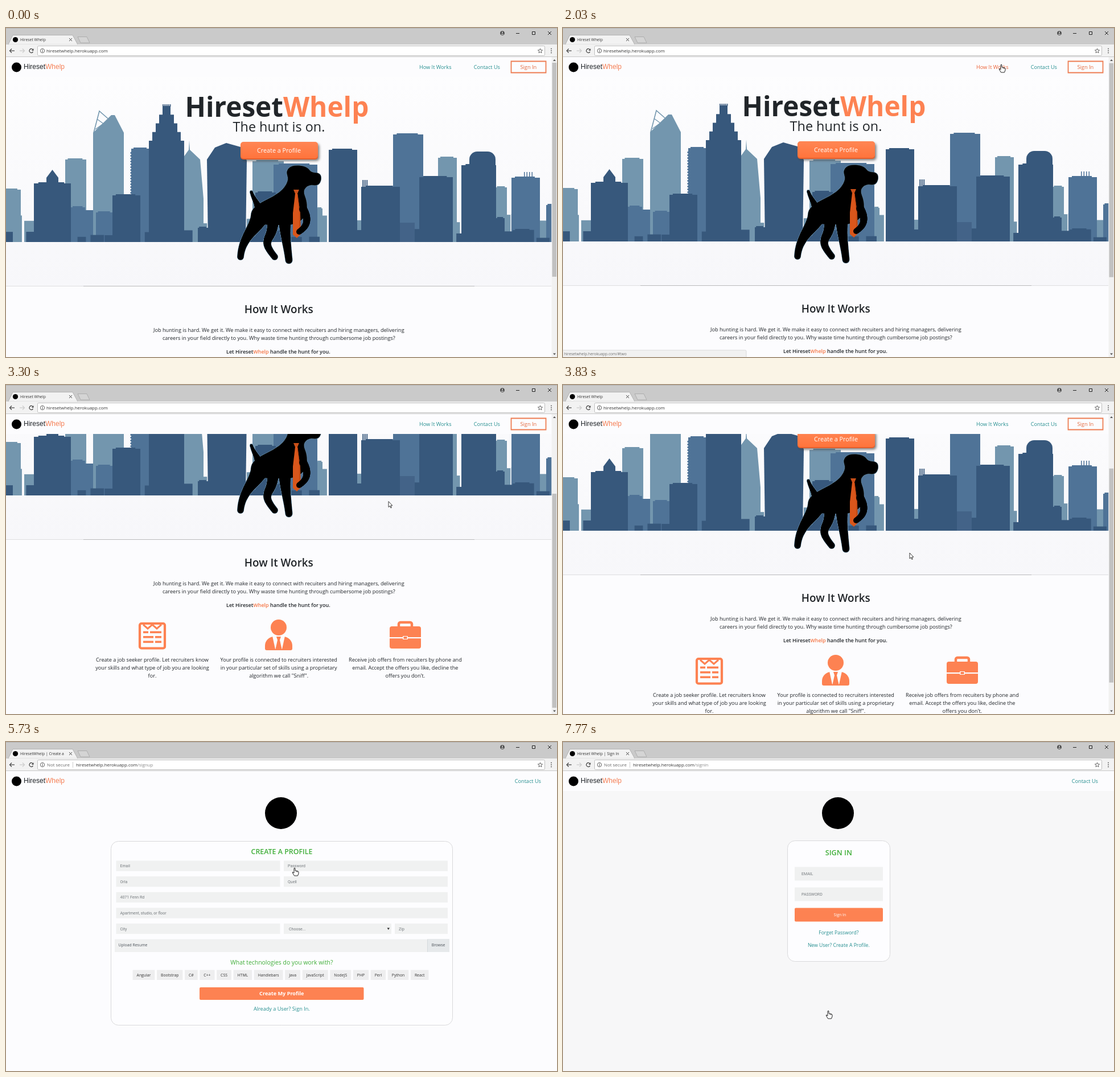
Animation, 968 px wide and 578 px high, one loop 8000 ms. Source, as an HTML page with a canvas:

```html
<!DOCTYPE html>
<html lang="en">
<head>
<meta charset="utf-8">
<title>Hireset Whelp</title>
<style>
html, body { margin: 0; width: 100%; height: 100%; overflow: hidden; background: #fcfcfe; }
canvas { display: block; width: 968px; height: 578px; }
</style>
</head>
<body>
<canvas id="stage" width="968" height="578"></canvas>
<script>
const ctx = document.getElementById('stage').getContext('2d');
const LOOP = 8000, MAX_SCROLL = 182;
const SIGNUP_AT = 5330, SIGNIN_AT = 7300;
const ORANGE = '#fd8252', TEAL = '#268f90', INK = '#212529', GREEN = '#3fae38', HOVER = '#ec6236';
const PAGE = '#fcfcfe', LIGHT = '#7396ae', MID = '#4f7397', DARK = '#37587c';
const HOST = 'hiresetwhelp.herokuapp.com';

const clamp = v => Math.min(1, Math.max(0, v));
const ramp = (t, a, b) => clamp((t - a) / (b - a));
const ease = p => p * p * (3 - 2 * p);
const mix = (a, b, p) => a + (b - a) * p;
const between = (t, a, b) => t >= a && t < b;

function randomizer(seed) {
  return () => {
    seed = (seed * 16807) % 2147483647;
    return seed / 2147483647;
  };
}

// ---------- drawing helpers ----------
function text(str, x, y, size, color = INK, { weight = 400, align = 'left', font = 'Open Sans' } = {}) {
  ctx.font = `${weight} ${size}px "${font}", sans-serif`;
  ctx.textAlign = align;
  ctx.fillStyle = color;
  ctx.fillText(str, x, y);
  return ctx.measureText(str).width;
}
const centered = (str, x, y, size, color, weight = 400) =>
  text(str, x, y, size, color, { weight, align: 'center' });

function paint(fill, stroke, line = 1) {
  if (fill) { ctx.fillStyle = fill; ctx.fill(); }
  if (stroke) { ctx.strokeStyle = stroke; ctx.lineWidth = line; ctx.stroke(); }
}
function rect(x, y, w, h, color) {
  ctx.fillStyle = color;
  ctx.fillRect(x, y, w, h);
}
function round(x, y, w, h, r, fill, stroke, line) {
  ctx.beginPath();
  ctx.roundRect(x, y, w, h, r);
  paint(fill, stroke, line);
}
function disc(x, y, r, fill, stroke, line) {
  ctx.beginPath();
  ctx.arc(x, y, r, 0, Math.PI * 2);
  paint(fill, stroke, line);
}
function trace(p, close) {
  ctx.beginPath();
  for (let i = 0; i < p.length; i += 2) ctx.lineTo(p[i], p[i + 1]);
  if (close) ctx.closePath();
}
const poly = (p, fill, stroke, line) => { trace(p, true); paint(fill, stroke, line); };
const lines = (p, stroke, line) => { trace(p, false); paint(null, stroke, line); };

// Closed curve through the midpoints of a polygon
function blob(p, fill, stroke, line) {
  const n = p.length;
  const mid = i => [(p[i % n] + p[(i + 2) % n]) / 2, (p[(i + 1) % n] + p[(i + 3) % n]) / 2];
  ctx.beginPath();
  ctx.moveTo(...mid(n - 2));
  for (let i = 0; i < n; i += 2) ctx.quadraticCurveTo(p[i], p[i + 1], ...mid(i));
  paint(fill, stroke, line);
}

// Tapered cubic curve
function limb([x0, y0, x1, y1, x2, y2, x3, y3], r0, r1, color) {
  const cubic = (a, b, c, d, p, q) => a * q ** 3 + 3 * b * p * q * q + 3 * c * p * p * q + d * p ** 3;
  for (let i = 0; i <= 48; i++) {
    const p = i / 48, q = 1 - p;
    disc(cubic(x0, x1, x2, x3, p, q), cubic(y0, y1, y2, y3, p, q), r1 + (r0 - r1) * q ** 1.5, color);
  }
}

// ---------- browser window ----------
function chrome(title, path, secureLabel) {
  rect(0, 0, 968, 29.5, '#cacaca');
  rect(0, 0, 968, 1, '#b4b4b4');
  rect(0, 29, 968, 22, '#f2f2f2');
  poly([4, 29, 12, 12.5, 117, 12.5, 126, 29], '#f2f2f2', '#a9a9a9', .8);
  rect(4.5, 28.5, 121, 2, '#f2f2f2');
  poly([126, 15.5, 142, 15.5, 147, 26, 131, 26], '#d4d4d4', '#a5a5a5', .8);
  disc(16.5, 20.5, 4.6, '#000');
  ctx.save();
  ctx.beginPath();
  ctx.rect(24, 12, 80, 16);
  ctx.clip();
  text(title, 25, 23, 6.85, '#333');
  ctx.restore();
  const cross = (x, y, r, color) => {
    lines([x - r, y - r, x + r, y + r], color);
    lines([x + r, y - r, x - r, y + r], color);
  };
  cross(113.5, 20.5, 2.5, '#444');

  disc(872, 9, 3.8, '#444');
  disc(872, 7.8, 1.3, '#ccc');
  rect(870, 10, 4, 1.5, '#ccc');
  lines([896, 9.5, 902, 9.5], '#222');
  round(924.5, 6.5, 5, 5, 0, null, '#222');
  cross(955, 9, 3, '#222');

  const arrow = (x, dir, color) => {
    lines([x - 4, 40, x + 4, 40], color, 1.2);
    lines([x + dir, 36.5, x + dir * 4.5, 40, x + dir, 43.5], color, 1.2);
  };
  arrow(11, -1, '#444');
  arrow(28, 1, '#ccc');
  ctx.beginPath();
  ctx.arc(44.5, 40, 3.4, .5, 5.5);
  paint(null, '#444', 1.2);
  poly([48.5, 36, 48.5, 39.8, 44.8, 39.8], '#444');

  round(55.5, 31.5, 891, 17, 2, '#fff', '#bebebe');
  disc(64, 40, 3.7, null, '#555', .9);
  rect(63.5, 39.3, 1.1, 3, '#555');
  rect(63.5, 37.5, 1.1, 1.1, '#555');
  let x = 71;
  if (secureLabel) {
    text('Not secure', 72, 43, 7.9, '#666');
    rect(117, 35, 1, 10, '#ccc');
    x = 123;
  }
  x += text(HOST, x, 43, 7.9, '#333');
  text(path, x, 43, 7.9, '#888');
  const star = [];
  for (let i = 0; i < 10; i++) {
    const a = i * Math.PI / 5 - Math.PI / 2, r = i % 2 ? 1.9 : 4.3;
    star.push(938.5 + r * Math.cos(a), 40.3 + r * Math.sin(a));
  }
  poly(star, null, '#555', .9);
  for (let y = 36.5; y < 44; y += 3.5) disc(958, y, .9, '#555');
  rect(0, 50, 968, 1, '#c8c8c8');
}

function brand() {
  disc(18.5, 69, 8.5, '#000');
  const w = text('Hireset', 31, 72.3, 12, INK, { font: 'Liberation Sans' });
  text('Whelp', 31 + w, 72.3, 12, '#f57f55', { font: 'Liberation Sans' });
}

function status(path, alpha) {
  if (alpha <= 0) return;
  ctx.globalAlpha = alpha;
  round(-2, 566, 324, 14, 2, '#f1f1f1', '#d2d2d2', .8);
  text(HOST + path, 2, 575, 6.7, '#707070');
  ctx.globalAlpha = 1;
}

function scrollbar(scroll) {
  rect(958.5, 51, 9.5, 527, '#f1f1f1');
  rect(959.5, 61 + scroll * 130 / MAX_SCROLL, 7.5, 376, '#c1c1c1');
  poly([961, 58, 966, 58, 963.5, 55], '#555');
  poly([961, 571.5, 966, 571.5, 963.5, 574.5], '#555');
}

// ---------- landing page ----------
const GROUND = 376;

// A block with a slightly raised roof ledge
function tower(x, w, top, color) {
  rect(x, top, w, GROUND - top, color);
  rect(x + w * .12, top - 2, w * .7, 2, color);
}

function spikes(x, count, gap, top, h, color) {
  for (let i = 0; i < count; i++) rect(x + i * gap, top, 1.5, h, color);
}

function lowRow(seed, color, minH, spread, gap) {
  const random = randomizer(seed);
  for (let x = 0; x < 958;) {
    const w = 12 + 18 * random(), h = minH + spread * random();
    rect(x, GROUND - h, w, h, color);
    x += w + gap * random();
  }
}

function skyline() {
  lowRow(11, LIGHT, 26, 24, 10);
  tower(-8, 34, 284, LIGHT);
  tower(104, 37, 231, LIGHT);
  tower(433, 55, 234, LIGHT);
  tower(759, 33, 228, LIGHT);
  tower(860, 20, 280, LIGHT);
  tower(546, 10, 317, LIGHT);
  poly([153, GROUND, 153, 184, 185, 153, 191, 153, 207, 184, 207, GROUND], LIGHT);
  lines([154, 184, 164, 146, 179, 159], LIGHT, 1.6);
  lines([160, 160, 171, 168, 157, 178], LIGHT, 1.3);
  poly([311, GROUND, 311, 228, 321, 214, 322, 197, 323, 214, 341, 231, 347, 300, 347, GROUND], LIGHT);

  tower(114, 25, 315, MID);
  rect(139, 320, 14, GROUND - 320, MID);
  tower(158, 30, 324, MID);
  tower(220, 33, 212, MID);
  tower(470, 77, 240, MID);
  tower(680, 53, 187, MID);
  tower(888, 50, 263, MID);
  tower(949, 20, 311, MID);
  for (let y = 218; y < 290; y += 5) rect(218.5, y, 2, 3, MID);
  spikes(910, 4, 4.5, 253, 9, MID);

  lowRow(5, DARK, 6, 18, 30);
  tower(49, 65, 273, DARK);
  poly([71, 273, 71, 263, 81.5, 249, 92, 263, 92, 273], DARK);
  tower(187, 49, 294, DARK);
  for (let i = 0; i < 5; i++) {
    const half = 31 - 6 * i, top = 198 - 15.25 * i;
    rect(282 - half, top, half * 2, GROUND - top, DARK);
  }
  spikes(275, 6, 2.6, 134, 4, DARK);
  tower(337, 18, 351, DARK);
  poly([355, GROUND, 353, 231, 367, 210, 387, 202, 412, 209, 423, 233, 421, GROUND], DARK);
  tower(438, 36, 289, DARK);
  tower(567, 50, 214, DARK);
  tower(624, 68, 279, DARK);
  spikes(626, 4, 2.6, 267, 12, DARK);
  rect(692, 342, 26, GROUND - 342, '#436388');
  tower(726, 59, 262, DARK);
  tower(800, 61, 241, DARK);
  round(814, 217, 46, 60, [14, 14, 0, 0], DARK);
  tower(861, 15, 334, DARK);
  tower(890, 36, 355, DARK);
}

const TORSO = [433, 318, 447, 307, 470, 296, 488, 283, 497, 266, 492, 253, 499, 243, 515, 241, 530, 245, 536, 254,
  552, 255, 554, 267, 548, 277, 532, 275, 521, 286, 529, 305, 528, 330, 508, 346, 475, 346, 445, 345, 429, 335];

function silhouette(color, grow) {
  limb([443, 314, 440, 306, 434, 298, 431, 288], 6 + grow, 2.3 + grow, color);
  limb([447, 328, 440, 352, 415, 366, 412, 402], 16 + grow, 5.5 + grow, color);
  limb([469, 336, 470, 376, 444, 368, 472, 402], 10 + grow, 5.5 + grow, color);
  limb([490, 335, 489, 360, 494, 380, 497, 408], 11 + grow, 6 + grow, color);
  blob(TORSO, color, color, .5 + 2 * grow);
}

function dog() {
  silhouette('#6c93ad', .6);
  silhouette('#000', 0);
  poly([505, 284, 515, 284, 512, 291, 508, 291], '#c94f18');
  poly([508, 291, 512, 291, 517, 325, 518, 362, 511, 369, 504, 363, 504, 325], '#d9561b');
  lines([512, 292, 516, 325, 516, 362], '#b8430f', 1.2);
  limb([522, 318, 535, 340, 526, 350, 515, 358], 7, 5, '#000');
}

function profileButton(hover) {
  const shade = (rest, over) => `rgb(255,${rest.map((c, i) => Math.round(mix(c, over[i], hover)))})`;
  ctx.save();
  ctx.shadowColor = 'rgba(60,60,60,.65)';
  ctx.shadowBlur = 4;
  ctx.shadowOffsetX = ctx.shadowOffsetY = 2.5;
  round(412, 201, 136, 30, 5, '#e55f2c');
  ctx.restore();
  const g = ctx.createLinearGradient(0, 200, 0, 229);
  g.addColorStop(0, shade([134, 84], [108, 50]));
  g.addColorStop(1, shade([116, 60], [92, 30]));
  round(412, 200, 136, 29, 5, g);
  centered('Create a Profile', 479.5, 219.3, 10.8, '#fff');
}

function resumeIcon() {
  round(235, 601, 44, 43.5, 3, null, ORANGE, 4.2);
  lines([241, 603, 249, 610, 257, 603, 265, 610, 273, 603], ORANGE, 3);
  for (let i = 0; i < 3; i++) {
    const y = 614.5 + 8.5 * i, w = i ? 18 : 9;
    rect(241, y, w, 3.6, ORANGE);
    rect(244 + w, y, 29 - w, 3.6, ORANGE);
  }
}
function personIcon() {
  disc(479, 608, 14, ORANGE);
  round(455, 624, 48, 24, [16, 16, 3, 3], ORANGE);
  poly([468, 623, 490, 623, 485, 646, 473, 646], PAGE);
  poly([475, 624, 483, 624, 481, 630, 485, 648, 473, 648, 477, 630], ORANGE);
}
function caseIcon() {
  round(690, 599, 23, 12, 3, null, ORANGE, 4.5);
  round(674, 606, 55, 39, 4, ORANGE);
  rect(674, 625, 55, 2.2, PAGE);
  round(697, 623, 9, 6, 1, PAGE);
  rect(698.5, 624, 6, 4, ORANGE);
}

const INTRO = [
  'Job hunting is hard. We get it. We make it easy to connect with recuiters and hiring managers, delivering',
  'careers in your field directly to you. Why waste time hunting through cumbersome job postings?'];
const COLUMNS = [
  ['Create a job seeker profile. Let recruiters know', 'your skills and what type of job you are looking', 'for.'],
  ['Your profile is connected to recruiters interested', 'in your particular set of skills using a proprietary',
    'algorithm we call "Sniff".'],
  ['Receive job offers from recuiters by phone and', 'email. Accept the offers you like, decline the', "offers you don't."]];

function landing(t, scroll) {
  rect(0, 51, 968, 527, PAGE);
  ctx.save();
  ctx.beginPath();
  ctx.rect(0, 86, 958.5, 492);
  ctx.clip();
  ctx.translate(0, -scroll);
  const sky = ctx.createLinearGradient(0, 86, 0, 453);
  sky.addColorStop(0, '#fdfdfe');
  sky.addColorStop(1, '#f7f7fa');
  rect(0, 51, 958.5, 402, sky);
  skyline();

  text('Hireset', 487, 155.8, 47.7, INK, { weight: 700, align: 'right' });
  text('Whelp', 487, 155.8, 47.7, ORANGE, { weight: 700 });
  centered('The hunt is on.', 479.5, 182, 23.4, INK);
  profileButton(ramp(t, 4780, 4860));
  dog();

  rect(0, 453, 958.5, 1, '#dedee0');
  rect(136, 453, 687, 1, '#b9b9bb');
  centered('How It Works', 479.3, 500.6, 18.9, INK, 600);
  INTRO.forEach((row, i) => centered(row, 479.3, 534 + 14.4 * i, 9.17, INK));
  let x = 387;
  for (const part of ['Let Hireset', 'Whelp', ' handle the hunt for you.'])
    x += text(part, x, 572, 9, part === 'Whelp' ? '#f57646' : INK, { weight: 600 });

  resumeIcon();
  personIcon();
  caseIcon();
  COLUMNS.forEach((rows, c) =>
    rows.forEach((row, i) => centered(row, 257 + 222.2 * c, 667.5 + 14.4 * i, 9.15, INK)));
  ctx.restore();

  brand();
  text('How It Works', 726, 72, 9.17, between(t, 1800, 2940) ? HOVER : TEAL);
  text('Contact Us', 821.7, 72, 9.17, between(t, 1310, 1600) ? HOVER : TEAL);
  round(887.5, 58.5, 61, 20, 0, null, '#ee7d52', 1.8);
  centered('Sign In', 917.8, 72, 9.2, '#e3673a');
  scrollbar(scroll);
}

// ---------- account pages ----------
function accountPage(color) {
  rect(0, 51, 968, 527, color);
  rect(0, 51, 968, 35, PAGE);
  brand();
  text('Contact Us', 893.7, 72, 9.17, TEAL);
  disc(483, 125, 28, '#000');
}
const card = (x, y, w, h) => round(x, y, w, h, 13, '#fdfdff', '#d9d9db');

function field(x, y, w, h, label, inset = 7) {
  rect(x, y, w, h, '#f0f1f1');
  text(label, x + inset, y + h / 2 + 2.5, 7, '#757a7e', { font: 'Roboto' });
}

const ROWS = [['Email', 'Password'], ['Orla', 'Quell'], ['4071 Fenn Rd'], ['Apartment, studio, or floor'],
  ['City', 'Choose...']];
const TAGS = ['Angular', 'Bootstrap', 'C#', 'C++', 'CSS', 'HTML', 'Handlebars', 'Java', 'JavaScript', 'NodeJS',
  'PHP', 'Perl', 'Python', 'React'];

function tags(cx, y) {
  const pad = 7, gap = 3.6;
  ctx.font = '400 6.85px "Open Sans", sans-serif';
  const widths = TAGS.map(name => ctx.measureText(name).width + 2 * pad);
  let x = cx - (widths.reduce((a, b) => a + b) + gap * (TAGS.length - 1)) / 2;
  TAGS.forEach((name, i) => {
    rect(x, y, widths[i], 17.5, '#eeeeef');
    text(name, x + pad, y + 11.5, 6.85, '#333');
    x += widths[i] + gap;
  });
}

function signup(t) {
  accountPage(PAGE);
  card(184.5, 174.5, 600, 323);
  centered('CREATE A PROFILE', 484.5, 196.5, 12.4, GREEN, 600);
  ROWS.forEach((labels, r) => labels.forEach((label, c) => {
    const last = label === 'Choose...';
    const w = labels.length === 1 ? 582.5 : last ? 189 : 288;
    field(193.5 + 294.5 * c, 208.5 + 27.6 * r, w, 18.3, label, last ? 9 : 7);
  }));
  poly([669.5, 326.5, 674, 326.5, 671.8, 330], '#333');
  field(683, 318.9, 93, 18.3, 'Zip');
  rect(191, 346.5, 588, 22.5, '#f0f1f1');
  text('Upload Resume', 197.5, 359, 6.9, '#495057');
  rect(740, 346.5, 39, 22.5, '#d5d9dc');
  rect(741, 346.5, 38, 22.5, '#e6e9eb');
  centered('Browse', 759.5, 359, 6.9, '#495057');
  centered('What technologies do you work with?', 484.3, 391, 10.4, GREEN);
  tags(482.5, 400.5);
  round(340, 431, 288.5, 22, 2, ORANGE);
  centered('Create My Profile', 484.3, 445.3, 9.15, '#fff', 700);
  centered('Already a User? Sign In.', 484.3, 472, 9.15, t > 6690 ? HOVER : TEAL);
}

function signin() {
  accountPage('#f7f7f8');
  card(394.5, 173.5, 180, 212);
  centered('SIGN IN', 484.3, 199, 12.7, GREEN, 600);
  field(407, 219.5, 155, 24, 'EMAIL', 12);
  field(407, 255.5, 155, 24, 'PASSWORD', 12);
  round(407, 291.5, 155, 24, 2, ORANGE);
  centered('Sign In', 486.5, 306, 6.9, '#fff');
  centered('Forget Password?', 484.3, 337.5, 8.6, TEAL);
  centered('New User? Create A Profile.', 484.3, 360.3, 8.6, TEAL);
}

// ---------- motion ----------
function scrollAt(t) {
  if (t > 3750) return MAX_SCROLL * (1 - ramp(t, 3750, 4180)) ** 2;
  const swing = .5 - .5 * Math.cos(Math.PI * ramp(t, 1990, 3270));
  return Math.min(MAX_SCROLL, 403 * swing);
}

// Pointer moves: start, end, destination x, y
const MOVES = [[430, 1230, 751, 244], [1230, 1330, 846, 65], [1500, 1870, 770, 64], [2900, 3600, 609, 295],
  [4120, 4470, 511, 239], [4740, 4860, 507, 221], [5970, 6330, 495, 355], [6470, 6730, 466, 472]];

function pointer(t) {
  if (t < MOVES[0][0]) return;
  let x = 700, y = 580;
  for (const [from, to, toX, toY] of MOVES) {
    const p = ease(ramp(t, from, to));
    x = mix(x, toX, p);
    y = mix(y, toY, p);
  }
  ctx.save();
  ctx.translate(x, y);
  ctx.lineJoin = 'round';
  if (between(t, 1310, 2940) || between(t, 4790, 5980) || t > 6690) {
    poly([-1, 1, 0, 0, 1, 1, 1, 5, 6, 6, 7, 7.5, 7, 10, 5.5, 14, -.5, 14, -3.5, 9, -3.5, 7.5, -1, 9], '#fff', '#222');
    lines([3, 5, 3, 7.5], '#222', .7);
    lines([5, 6, 5, 8], '#222', .7);
  } else {
    poly([0, 0, 0, 10, 2.3, 8, 4, 11.5, 5.3, 10.8, 3.8, 7.4, 6.8, 7.2], '#fff', '#222', .9);
  }
  ctx.restore();
}

function draw(t) {
  if (t < SIGNUP_AT) {
    landing(t, Math.round(scrollAt(t)));
    chrome('Hireset Whelp', '', false);
  } else if (t < SIGNIN_AT) {
    signup(t);
    chrome('HiresetWhelp | Create a Profile', '/signup', true);
  } else {
    signin();
    chrome('Hireset Whelp | Sign In', '/signin', true);
  }
  status('/#two', ramp(t, 1650, 1800) - ramp(t, 2980, 3130));
  status('/signup', ramp(t, 4830, 5000) - ramp(t, 5600, 5720));
  status('/signin', ramp(t, 6880, 7050) - ramp(t, 7640, 7760));
  pointer(t);
}

function tick() {
  draw(performance.now() % LOOP);
  requestAnimationFrame(tick);
}
tick();
</script>
</body>
</html>
```
